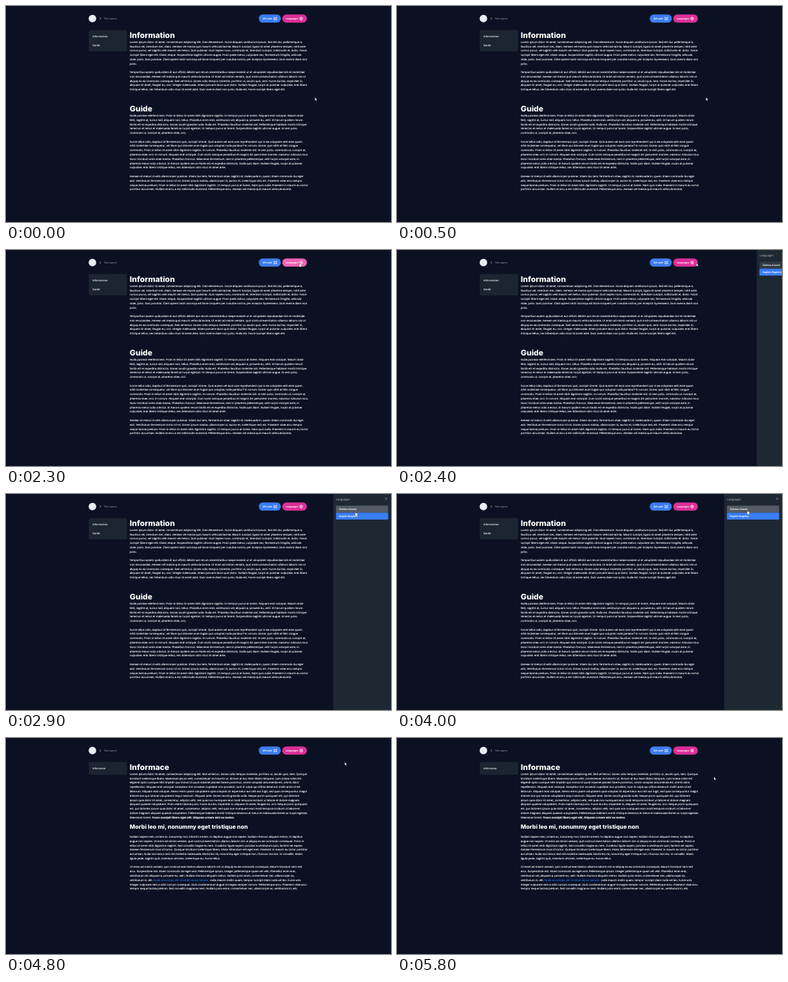
Recreate the animation shown at these times as an HTML page. Size 600x338 px, loop 6000 ms.

```html
<!DOCTYPE html>
<html lang="en">
<head>
<meta charset="utf-8">
<title>Guide page</title>
<style>
html, body { margin: 0; width: 100%; height: 100%; overflow: hidden; background: #0b1123; }
svg { display: block; width: 100vw; height: 100vh; }
text { font-family: "Open Sans", "Noto Sans", sans-serif; fill: #fff; text-rendering: geometricPrecision; white-space: pre; }
.body { font-size: 4.255px; stroke: #fff; stroke-width: .13; }
.link { fill: #2f6fe4; stroke: #2f6fe4; }
.head { font-family: Inter, sans-serif; font-weight: 800; }
.menu { font-size: 4.15px; font-weight: 600; }
.btn { font-size: 3.65px; font-weight: 700; }
.rule { stroke: #171e33; stroke-width: .4; stroke-dasharray: 1 1; }
.icon { fill: none; stroke: #fff; stroke-width: .55; }
</style>
</head>
<body>
<svg viewBox="0 0 600 338">
  <rect width="600" height="338" fill="#0b1123"/>
  <circle cx="134.7" cy="19.6" r="5.9" fill="#e8ecf4"/>
  <path d="M146.1 18l1.6 1.7l-1.6 1.7" fill="none" stroke="#d5d9e2" stroke-width=".7"/>
  <text x="152.8" y="20.9" font-size="3.65" style="fill:#bcc1cb">Test Layout</text>

  <rect x="393.9" y="13.2" width="34.4" height="12.9" rx="6.45" fill="#3b7df2"/>
  <text class="btn" x="399.8" y="21">QR code</text>
  <g class="icon">
    <path d="M417.3 17.6h1.8v1.6h-1.8zM420.2 17.6h1.8v1.6h-1.8zM417.3 20.3h1.8v1.6h-1.8zM420.2 20.3h1.8v1.6h-1.8z"/>
  </g>
  <rect id="langBtn" x="430.6" y="13.2" width="38.3" height="12.9" rx="6.45"/>
  <text class="btn" x="435.9" y="21">Languages</text>
  <g class="icon">
    <circle cx="460" cy="19.7" r="2.4"/>
    <ellipse cx="460" cy="19.7" rx="1.1" ry="2.4"/>
    <path d="M457.6 19.7h4.8"/>
  </g>

  <rect id="side" x="129" y="37.5" width="59.6" rx="2" fill="#1b2531"/>
  <g id="en"></g>
  <g id="cs"></g>

  <g id="panel">
    <rect x="510" width="90" height="338" fill="#1e2833"/>
    <text x="514.4" y="9.8" font-size="4.35" style="fill:#c3c9d2">Languages</text>
    <path d="M590.9 5.7l3.4 3.4m0-3.4l-3.4 3.4" stroke="#c3c9d2" stroke-width=".5"/>
    <rect id="row" x="514.2" y="18.3" width="81.4" height="10.8" rx=".8"/>
    <rect x="514.2" y="29.3" width="81.4" height="10.8" rx=".8" fill="#3b7df2"/>
    <text class="btn" x="519" y="25.1">Čeština (Czech)</text>
    <text class="btn" x="519" y="36.1">English (English)</text>
  </g>

  <g id="cursor" stroke="#000" stroke-linejoin="round">
    <path id="arrow" transform="scale(.3)" fill="#fff" d="M0 0V17L4 13.4L6.6 19.2L9.2 18L6.6 12.4H12Z"/>
    <path id="hand" transform="scale(.3) translate(-6 0)" fill="#fff" d="M4.5 13V2Q6 -1 7.5 2V8Q9 6.6 10.5 8.4Q12 7.4 13.5 9.2Q16.5 8.5 16.5 11V16L14.5 22H6.5L1 14Q0 11 2.5 11.5Z"/>
  </g>
</svg>
<script>
const LOOP = 6000, STEP = 100, LEFT = 192.8, PITCH = 6.8;
const $ = id => document.getElementById(id);

function add(parent, tag, attrs, content) {
  const el = document.createElementNS("http://www.w3.org/2000/svg", tag);
  for (const k in attrs) el.setAttribute(k, attrs[k]);
  if (content) el.innerHTML = content;
  parent.append(el);
}
const head = (g, y, size, s) => add(g, "text", { class: "head", x: LEFT, y, "font-size": size }, s);
const menu = (g, y, s) => add(g, "text", { class: "menu", x: 134.7, y }, s);
const rule = (g, y) => add(g, "path", { class: "rule", d: `M193 ${y}H477` });
const para = (g, y, s) => s.trim().split("\n").forEach((line, i) =>
  add(g, "text", { class: "body", x: LEFT, y: y + i * PITCH }, line));

const en = $("en"), cs = $("cs");

menu(en, 48.6, "Information");
menu(en, 62.5, "Guide");
head(en, 50.2, 12.15, "Information");
para(en, 57.8, `
Lorem ipsum dolor sit amet, consectetuer adipiscing elit. Cras elementum. Fusce aliquam vestibulum ipsum. Sed elit dui, pellentesque a,
faucibus vel, interdum nec, diam. Aenean vel massa quis mauris vehicula lacinia. Mauris suscipit, ligula sit amet pharetra semper, nibh ante
cursus purus, vel sagittis velit mauris vel metus. Duis pulvinar. Duis sapien nunc, commodo et, interdum suscipit, sollicitudin et, dolor. Fusce
suscipit libero eget elit. Etiam neque. Suspendisse sagittis ultrices augue. Proin pede metus, vulputate nec, fermentum fringilla, vehicula
vitae, justo. Duis pulvinar. Class aptent taciti sociosqu ad litora torquent per conubia nostra, per inceptos hymenaeos. Duis viverra diam non
justo.`);
para(en, 105, `
Temporibus autem quibusdam et aut officiis debitis aut rerum necessitatibus saepe eveniet ut et voluptates repudiandae sint et molestiae
non recusandae. Aenean vel massa quis mauris vehicula lacinia. Ut enim ad minim veniam, quis nostrud exercitation ullamco laboris nisi ut
aliquip ex ea commodo consequat. Sed vel lectus. Donec odio tempus molestie, porttitor ut, iaculis quis, sem. Fusce dui leo, imperdiet in,
aliquam sit amet, feugiat eu, orci. Integer malesuada. Etiam posuere lacus quis dolor. Nullam feugiat, turpis at pulvinar vulputate, erat libero
tristique tellus, nec bibendum odio risus sit amet ante. Duis viverra diam non justo. Nulla est. Fusce suscipit libero eget elit.`);
rule(en, 145.5);
head(en, 165.2, 12.15, "Guide");
para(en, 172.9, `
Nulla pulvinar eleifend sem. Proin in tellus sit amet nibh dignissim sagittis. Ut tempus purus at lorem. Aliquam erat volutpat. Mauris dolor
felis, sagittis at, luctus sed, aliquam non, tellus. Phasellus enim erat, vestibulum vel, aliquam a, posuere eu, velit. Et harum quidem rerum
facilis est et expedita distinctio. Donec iaculis gravida nulla. Nulla est. Phasellus faucibus molestie nisl. Pellentesque habitant morbi tristique
senectus et netus et malesuada fames ac turpis egestas. Ut tempus purus at lorem. Suspendisse sagittis ultrices augue. In sem justo,
commodo ut, suscipit at, pharetra vitae, orci.`);
para(en, 213.6, `
Fusce tellus odio, dapibus id fermentum quis, suscipit id erat. Quis autem vel eum iure reprehenderit qui in ea voluptate velit esse quam
nihil molestiae consequatur, vel illum qui dolorem eum fugiat quo voluptas nulla pariatur? In rutrum. Donec quis nibh at felis congue
commodo. Proin in tellus sit amet nibh dignissim sagittis. In rutrum. Phasellus faucibus molestie nisl. In sem justo, commodo ut, suscipit at,
pharetra vitae, orci. In rutrum. Aliquam erat volutpat. Cum sociis natoque penatibus et magnis dis parturient montes, nascetur ridiculus mus.
Nunc tincidunt ante vitae massa. Phasellus rhoncus. Maecenas fermentum, sem in pharetra pellentesque, velit turpis volutpat ante, in
pharetra metus odio a lectus. Et harum quidem rerum facilis est et expedita distinctio. Nulla quis diam. Nullam feugiat, turpis at pulvinar
vulputate, erat libero tristique tellus, nec bibendum odio risus sit amet ante.`);
para(en, 268, `
Aenean id metus id velit ullamcorper pulvinar. Etiam dui sem, fermentum vitae, sagittis id, malesuada in, quam. Etiam commodo dui eget
wisi. Vestibulum fermentum tortor id mi. Donec ipsum massa, ullamcorper in, auctor et, scelerisque sed, est. Praesent vitae arcu tempor
neque lacinia pretium. Proin in tellus sit amet nibh dignissim sagittis. Ut tempus purus at lorem. Nam quis nulla. Praesent in mauris eu tortor
porttitor accumsan. Nullam at arcu a est sollicitudin euismod. Pellentesque arcu. Aenean vel massa quis mauris vehicula lacinia.`);
rule(en, 301);

menu(cs, 48.6, "Informace");
head(cs, 50.2, 12.15, "Informace");
para(cs, 57.8, `
Lorem ipsum dolor sit amet, consectetuer adipiscing elit. Sed vel lectus. Donec odio tempus molestie, porttitor ut, iaculis quis, sem. Quisque
tincidunt scelerisque libero. Maecenas ipsum velit, consectetuer eu lobortis ut, dictum at dui. Nam libero tempore, cum soluta nobis est
eligendi optio cumque nihil impedit quo minus id quod maxime placeat facere possimus, omnis voluptas assumenda est, omnis dolor
repellendus. Aliquam erat volutpat. Excepteur sint occaecat cupidatat non proident, sunt in culpa qui officia deserunt mollit anim id est
laborum. Aliquam erat volutpat. Nemo enim ipsam voluptatem quia voluptas sit aspernatur aut odit aut fugit, sed quia consequuntur magni
dolores eos qui ratione voluptatem sequi nesciunt. Aliquam ante. Donec iaculis gravida nulla. Neque porro quisquam est, qui dolorem
ipsum quia dolor sit amet, consectetur, adipisci velit, sed quia non numquam eius modi tempora incidunt ut labore et dolore magnam
aliquam quaerat voluptatem. Proin mattis lacinia justo. Fusce dui leo, imperdiet in, aliquam sit amet, feugiat eu, orci. Neque porro quisquam
est, qui dolorem ipsum quia dolor sit amet, consectetur, adipisci velit, sed quia non numquam eius modi tempora incidunt ut labore et
dolore magnam aliquam quaerat voluptatem. Pellentesque habitant morbi tristique senectus et netus et malesuada fames ac turpis egestas.
Maecenas lorem. <tspan font-weight="700">Fusce suscipit libero eget elit. Aliquam ornare wisi eu metus.</tspan>`);
head(cs, 141.8, 8.97, "Morbi leo mi, nonummy eget tristique non");
para(cs, 156, `
Nullam sapien sem, ornare ac, nonummy non, lobortis a enim. In dapibus augue non sapien. Nullam rhoncus aliquam metus. In dapibus
augue non sapien. Ut enim ad minim veniam, quis nostrud exercitation ullamco laboris nisi ut aliquip ex ea commodo consequat. Proin in
tellus sit amet nibh dignissim sagittis. Sed convallis magna eu sem. Curabitur ligula sapien, pulvinar a vestibulum quis, facilisis vel sapien.
Aenean fermentum risus id tortor. Quisque tincidunt scelerisque libero. Etiam bibendum elit eget erat. Praesent in mauris eu tortor porttitor
accumsan. Nulla non lectus sed nisl molestie malesuada. Morbi leo mi, nonummy eget tristique non, rhoncus non leo. In convallis. Etiam
ligula pede, sagittis quis, interdum ultricies, scelerisque eu. Fusce tellus.`);
para(cs, 203.3, `
Ut enim ad minim veniam, quis nostrud exercitation ullamco laboris nisi ut aliquip ex ea commodo consequat. Mauris tincidunt sem sed
arcu. Suspendisse nisl. Etiam commodo dui eget wisi. Pellentesque ipsum. Integer pellentesque quam vel velit. Phasellus enim erat,
vestibulum vel, aliquam a, posuere eu, velit. Nullam rhoncus aliquam metus. Nullam justo enim, consectetuer nec, ullamcorper ac,
vestibulum in, elit. <tspan class="link">Nulla accumsan, elit sit amet varius semper,</tspan> nulla mauris mollis quam, tempor suscipit diam nulla vel leo. Fusce wisi.
Integer vulputate sem a nibh rutrum consequat. Duis condimentum augue id magna semper rutrum. Pellentesque arcu. Praesent vitae arcu
tempor neque lacinia pretium. Sed convallis magna eu sem. Nullam justo enim, consectetuer nec, ullamcorper ac, vestibulum in, elit.`);

// Pointer stops: time, x, y
const path = [
  [0, 481.5, 143], [600, 481.5, 143], [1000, 480, 142.3], [1500, 480, 142.3],
  [2100, 457.5, 19.8], [2300, 457.5, 19.8], [2800, 544, 27.5], [2900, 544.8, 27.6],
  [3200, 544, 29], [3700, 544, 29], [3800, 546.3, 25.3], [4600, 546.3, 25.3],
  [5100, 494, 60.7], [LOOP, 494, 60.7]
];
const clamp = v => Math.max(0, Math.min(1, v));
const smooth = v => v * v * (3 - 2 * v);
const within = (t, a, b) => t >= a && t < b;
const show = (id, on) => $(id).setAttribute("display", on ? "inline" : "none");

function pointer(t) {
  const i = path.findIndex(p => p[0] > t);
  const [t0, x0, y0] = path[i - 1], [t1, x1, y1] = path[i];
  const k = smooth((t - t0) / (t1 - t0));
  return [x0 + (x1 - x0) * k, y0 + (y1 - y0) * k];
}

function draw(time) {
  const t = Math.floor(time % LOOP / STEP) * STEP;
  const czech = t >= 4100;
  const onButton = within(t, 2000, 2400), onRow = within(t, 2800, 4200);
  const slide = 1 - (1 - clamp((t - 2300) / 400)) ** 2;

  show("en", !czech);
  show("cs", czech);
  $("side").setAttribute("height", czech ? 20 : 33.6);
  $("langBtn").setAttribute("fill", onButton ? "#f062b4" : "#dc2f98");
  $("row").setAttribute("fill", onRow ? "#545b66" : "#2f3945");
  show("panel", slide > 0 && !czech);
  $("panel").setAttribute("transform", `translate(${90 * (1 - slide)} 0)`);
  $("cursor").setAttribute("transform", `translate(${pointer(t)})`);
  show("hand", onButton || onRow);
  show("arrow", !onButton && !onRow);
}

const start = performance.now();
function tick() {
  draw(performance.now() - start);
  requestAnimationFrame(tick);
}
tick();
</script>
</body>
</html>
```
